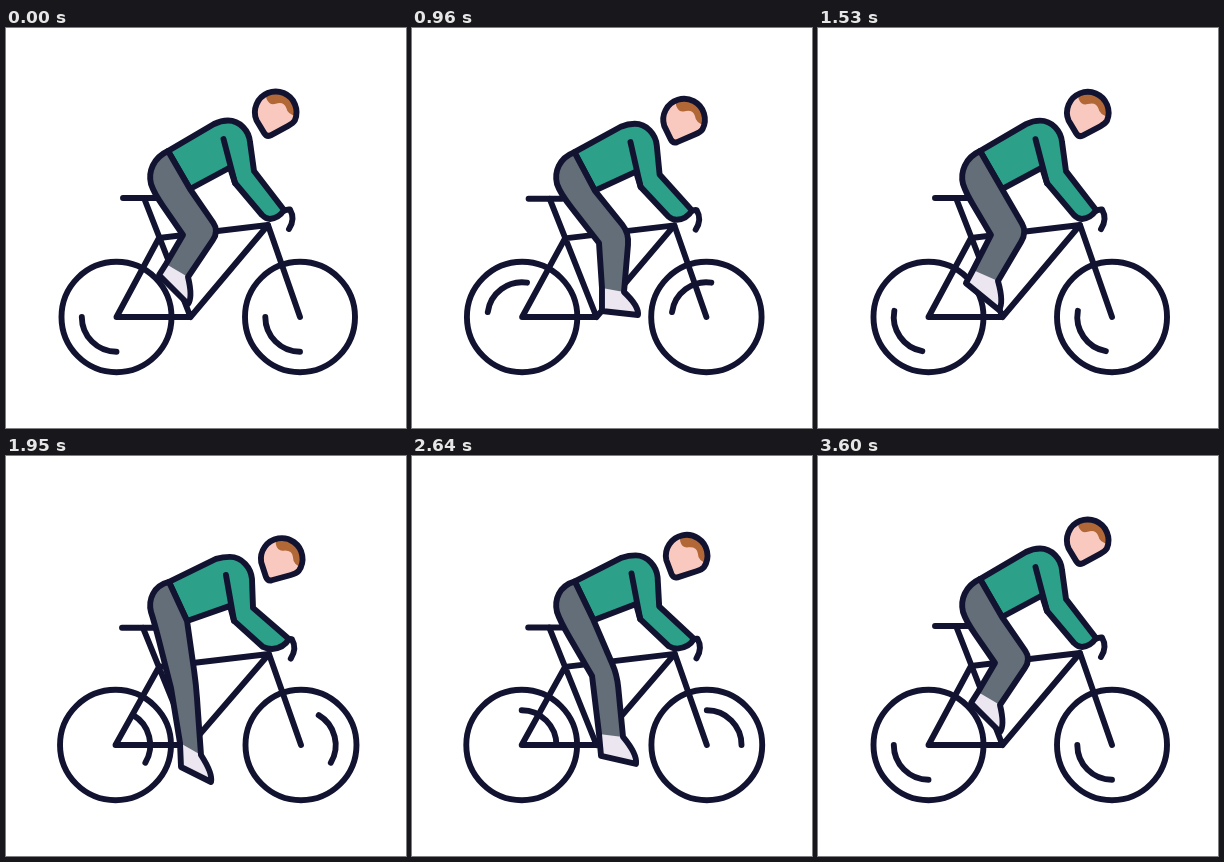
An HTML page with a canvas that plays this animation: 400 px wide and 400 px high, repeating every 3630 ms.

```html
<!DOCTYPE html>
<html lang="en">
<head>
<meta charset="utf-8">
<title>Cyclist</title>
<style>
html, body { margin: 0; width: 100%; height: 100%; overflow: hidden; background: #fff; }
canvas { display: block; width: 400px; height: 400px; }
</style>
</head>
<body>
<canvas id="stage" width="400" height="400"></canvas>
<script>
const ctx = document.getElementById('stage').getContext('2d');
const INK = '#121331', GREEN = '#2ca089', GREY = '#646e78';
const SHOE = '#ebe6ef', SKIN = '#f9c9c0', HAIR = '#b26836';
const STEP = 30, STEPS = 121, TURN = Math.PI * 2;

const mix = (a, b, k) => a + (b - a) * k;
const mixPt = (p, q, k) => [mix(p[0], q[0], k), mix(p[1], q[1], k)];

// Pedal phase, then x,y of: knee back, knee front, ankle back, ankle front, heel, toe
const LEG = [
  [0,     177, 207, 213, 203, 160, 236, 182, 249, 153, 247, 182, 276],
  [0.231, 187, 215, 217, 205, 190, 260, 212, 264, 190, 283, 226, 287],
  [0.385, 180, 220, 205, 219, 187, 278, 211, 281, 189, 300, 224, 308],
  [0.5,   165, 232, 190, 228, 174, 287, 195, 299, 175, 311, 205, 326],
  [0.692, 156, 232, 184, 235, 149, 280, 173, 291, 145, 303, 175, 319],
  [0.962, 173, 207, 209, 204, 155, 242, 180, 253, 148, 255, 181, 282]
];

// Torso points: upright x,y then crouched x,y
const TORSO = {
  waist: [162, 123, 163, 126],
  back: [208, 96, 210, 103],
  nape: [222, 92.5, 224, 101],
  shoulder: [244, 114, 246, 123],
  elbow: [248, 143, 247, 152],
  wrist: [278, 182, 283, 183],
  hand: [264, 191, 266, 193],
  cuff: [256, 187, 257, 191],
  crook: [229, 155, 228, 165],
  seam: [217.5, 111, 220, 119],
  armpit: [224, 139.5, 224, 150],
  hip: [184, 161, 181, 165]
};

// Pedalling is steady, then the last half turn slows to rest
function pedalAt(n) {
  if (n < 92) return (n / 26) % 1;
  const u = (n - 92) / 28;
  return mix(14 / 26, 1, 1 - (1 - u) ** 1.5) % 1;
}

function crouchAt(n) {
  const last = n >= 78;
  const c = last ? n - 78 : n % 26;
  if (c < 14) return (1 - Math.cos(Math.PI * c / 14)) / 2;
  return (1 + Math.cos(Math.PI * (c - 14) / (last ? 28 : 12))) / 2;
}

function wheelAt(n) {
  const deg = n < 88 ? n * 1260 / 88 : 1260 + 180 * (1 - (1 - (n - 88) / 32) ** 2.55);
  return deg * Math.PI / 180;
}

// Periodic cubic through the leg poses
function legAt(p) {
  const m = LEG.length;
  const time = i => LEG[(i + m) % m][0] + Math.floor(i / m);
  const val = (i, k) => LEG[(i + m) % m][k];
  const slope = (i, k) => {
    const h1 = time(i) - time(i - 1), h2 = time(i + 1) - time(i);
    const d1 = (val(i, k) - val(i - 1, k)) / h1, d2 = (val(i + 1, k) - val(i, k)) / h2;
    return (d1 * h2 + d2 * h1) / (h1 + h2);
  };
  let i = 0;
  while (i < m - 1 && time(i + 1) <= p) i++;
  const h = time(i + 1) - time(i), s = (p - time(i)) / h;
  const at = k => {
    const ease = s * s * (3 - 2 * s);
    return mix(val(i, k), val(i + 1, k), ease)
      + h * s * (1 - s) * ((1 - s) * slope(i, k) - s * slope(i + 1, k));
  };
  return [1, 3, 5, 7, 9, 11].map(k => [at(k), at(k + 1)]);
}

function line(...pts) {
  ctx.beginPath();
  pts.forEach(p => ctx.lineTo(...p));
  ctx.stroke();
}

function drawWheel(x, rx, turn) {
  ctx.beginPath();
  ctx.ellipse(x, 289, rx, 55.2, 0, 0, TURN);
  ctx.stroke();
  ctx.beginPath();
  ctx.arc(x, 289, 34.7, turn + TURN / 4, turn + TURN / 2);
  ctx.stroke();
}

function drawBike(b, turn) {
  const rx = 55 + 0.5 * b;
  const rear = 110.5 - b, front = 294 + b;
  drawWheel(rear, rx, turn);
  drawWheel(front, rx, turn);
  const head = [262 + b, 197 + b], joint = [153, 210 + b], crank = [184.5, 289];
  const seatY = 170 + 1.8 * b;
  line([117 - b, seatY], [150, seatY]);
  line([138 - b, seatY], crank, [rear, 289], joint, head, crank);
  line(head, [front, 289]);
  ctx.save();
  ctx.translate(1.8 * b, 1.6 * b);
  ctx.beginPath();
  ctx.moveTo(276, 184);
  ctx.quadraticCurveTo(280, 181, 284, 181.5);
  ctx.quadraticCurveTo(289.5, 191, 283, 201);
  ctx.stroke();
  ctx.restore();
}

function drawTorso(t) {
  ctx.beginPath();
  ctx.moveTo(...t.waist);
  ctx.lineTo(...t.back);
  ctx.quadraticCurveTo(t.nape[0] - 7, t.nape[1], ...t.nape);
  ctx.bezierCurveTo(t.nape[0] + 12, t.nape[1], t.shoulder[0] - 1, t.shoulder[1] - 11, ...t.shoulder);
  ctx.lineTo(...t.elbow);
  ctx.lineTo(...t.wrist);
  ctx.quadraticCurveTo(t.wrist[0] - 5, t.hand[1] - 1, ...t.hand);
  ctx.quadraticCurveTo(t.cuff[0] + 4, t.hand[1], ...t.cuff);
  ctx.lineTo(...t.crook);
  ctx.lineTo(...t.armpit);
  ctx.lineTo(...t.hip);
  ctx.closePath();
  ctx.fillStyle = GREEN;
  ctx.fill();
  ctx.stroke();
  line(t.seam, t.crook);
}

function drawLeg(t, [kneeB, kneeF, ankleB, ankleF, heel, toe]) {
  const len = Math.hypot(toe[0] - heel[0], toe[1] - heel[1]);
  const bulge = mixPt(toe, ankleF, 0.42).map((v, i) => v + 7 * (toe[i] - heel[i]) / len);
  const seat = [148, 165];
  const leg = new Path2D();
  leg.moveTo(...t.waist);
  leg.bezierCurveTo(147, 130, 142, 144, 145, 156);
  leg.quadraticCurveTo(...seat, ...mixPt(seat, kneeB, 0.3));
  leg.lineTo(...kneeB);
  leg.lineTo(...ankleB);
  leg.lineTo(...heel);
  leg.lineTo(...toe);
  leg.quadraticCurveTo(...bulge, ...ankleF);
  leg.lineTo(...mixPt(kneeF, ankleF, 0.2));
  leg.quadraticCurveTo(...kneeF, ...mixPt(kneeF, t.hip, 0.2));
  leg.lineTo(...t.hip);
  leg.closePath();
  ctx.fillStyle = GREY;
  ctx.fill(leg);

  ctx.beginPath();
  ctx.moveTo(...ankleB);
  ctx.lineTo(...heel);
  ctx.lineTo(...toe);
  ctx.quadraticCurveTo(...bulge, ...ankleF);
  ctx.fillStyle = SHOE;
  ctx.fill();
  ctx.stroke(leg);
}

function drawHead(b) {
  ctx.save();
  ctx.translate(269.7 + 6.1 * b, 84.3 + 18.9 * b);
  ctx.rotate(13 * b * Math.PI / 180);
  const face = new Path2D();
  face.arc(0, 0, 20.8, 2.75, TURN + 0.4);
  face.quadraticCurveTo(17.5, 11, 12.5, 13.6);
  face.lineTo(-5, 23);
  face.quadraticCurveTo(-9, 24.8, -11.5, 20.8);
  face.closePath();
  ctx.fillStyle = SKIN;
  ctx.fill(face);
  ctx.save();
  ctx.clip(face);
  ctx.beginPath();
  ctx.moveTo(-12, -24);
  ctx.lineTo(-9, -13);
  ctx.quadraticCurveTo(-6, -6.5, 0, -8.5);
  ctx.quadraticCurveTo(8, -11, 10.5, -4.5);
  ctx.quadraticCurveTo(12, 3, 22, 4);
  ctx.lineTo(26, -24);
  ctx.fillStyle = HAIR;
  ctx.fill();
  ctx.restore();
  ctx.stroke(face);
  ctx.restore();
}

function draw(n) {
  const b = crouchAt(n), torso = {};
  for (const k in TORSO) torso[k] = mixPt(TORSO[k].slice(0, 2), TORSO[k].slice(2), b);
  ctx.fillStyle = '#fff';
  ctx.fillRect(0, 0, 400, 400);
  ctx.strokeStyle = INK;
  ctx.lineWidth = 5.9;
  ctx.lineCap = ctx.lineJoin = 'round';
  drawBike(b, wheelAt(n));
  drawTorso(torso);
  drawLeg(torso, legAt(pedalAt(n)));
  drawHead(b);
}

const start = performance.now();
function tick() {
  draw(Math.floor((performance.now() - start) / STEP) % STEPS);
  requestAnimationFrame(tick);
}
tick();
</script>
</body>
</html>
```
